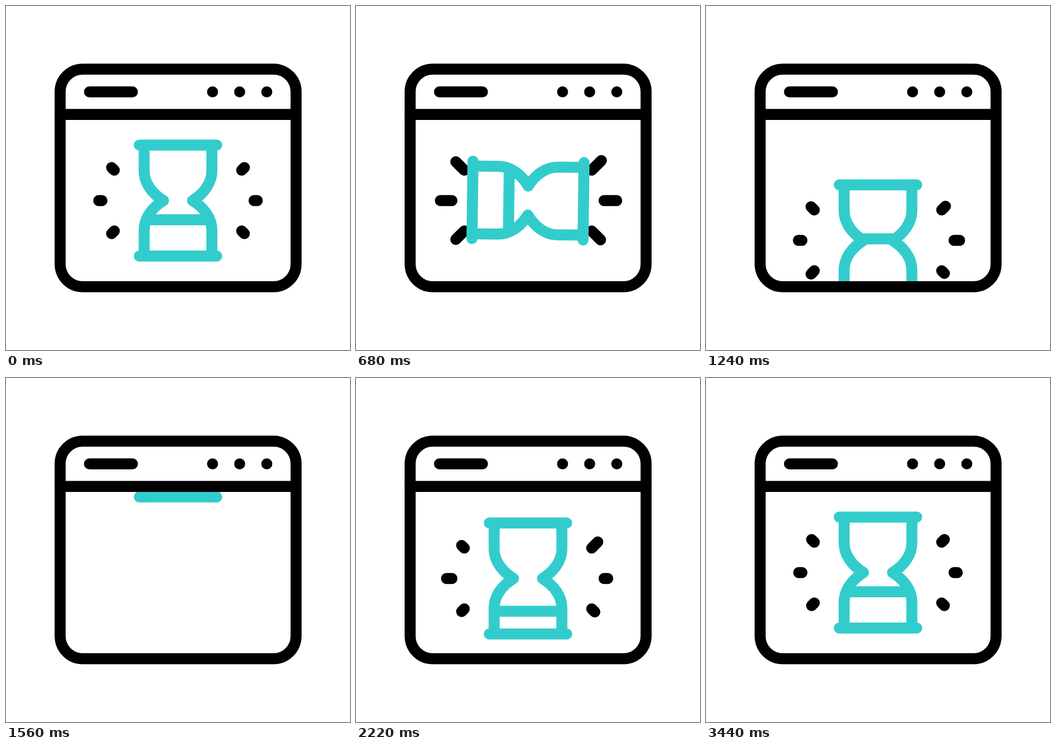
These frames come from a looping animation (640 by 640 pixels, 3.6 s). An HTML page:

```html
<!DOCTYPE html>
<html lang="en">
<head>
<meta charset="utf-8">
<title>Loading window</title>
<style>
  html, body { margin: 0; height: 100%; overflow: hidden; background: #fff; }
  svg { display: block; width: 100vw; height: 100vh; }
</style>
</head>
<body>
<svg viewBox="0 0 640 640" fill="none" stroke-width="20.5" stroke-linecap="round" stroke-linejoin="round">
  <clipPath id="page"><rect x="105" y="202" width="430" height="320"/></clipPath>
  <clipPath id="inside">
    <path d="M-63-103V-55C-63-32-47-12-27 0C-47 12-63 32-63 55V103H63V55C63 32 47 12 27 0C47-12 63-32 63-55V-103Z"/>
  </clipPath>
  <g clip-path="url(#page)">
    <g id="mover">
      <g id="rays" stroke="#000"></g>
      <g id="glass" stroke="#33cccc">
        <g clip-path="url(#inside)"><path id="sand" d="M-70 0H70"/></g>
        <path d="M-72-103.3H72M-72 103.3H72"/>
        <path d="M-63-103V-55C-63-32-47-12-27 0C-47 12-63 32-63 55V103"/>
        <path d="M63-103V-55C63-32 47-12 27 0C47 12 63 32 63 55V103"/>
      </g>
    </g>
  </g>
  <g stroke="#000">
    <rect x="100.7" y="117.5" width="439" height="404.8" rx="42"/>
    <path d="M101 201.7H539M155.3 159.7H235.2M384.3 159.7h.01M434.7 159.7h.01M485.2 159.7h.01"/>
  </g>
</svg>
<script>
const LOOP = 3600, START = 160, END = 3440;
const $ = id => document.getElementById(id);
const clamp = (v, lo = 0, hi = 1) => Math.min(hi, Math.max(lo, v));
const span = (t, a, b) => clamp((t - a) / (b - a));
const smooth = u => (1 - Math.cos(Math.PI * u)) / 2;

// Inner end, direction, shortest length, growth, phase drift
const rays = [
  [-118.5, -56.5, -1, -1, 5, 11, 0.13],
  [-141.5, 0, -1, 0, 6, 16, -0.06],
  [-118.5, 56.5, -1, 1, 5, 11, 0.13],
  [118.5, -56.5, 1, -1, 5, 14, -0.13],
  [141.5, 0, 1, 0, 6, 18.5, 0.2],
  [118.5, 56.5, 1, 1, 5, 11.5, 0.03],
].map(([x, y, dx, dy, min, grow, drift]) => {
  const el = document.createElementNS("http://www.w3.org/2000/svg", "path");
  $("rays").append(el);
  return u => {
    const phase = 3 * u + drift * Math.sin(Math.PI * u);
    const length = min + grow * smooth(2 * phase);
    el.setAttribute("d", `M${x} ${y}l${dx * length} ${dy * length}`);
  };
});

// Half turn with a small swing back before and past the end
function turn(t) {
  if (t >= 1490) return 0;
  const c = 1.356, v = 2 * span(t, START, 1200);
  const back = x => x * x * ((c + 1) * x - c) / 2;
  return 180 * (v < 1 ? back(v) : 1 - back(2 - v));
}

// Lifts, drops out below, comes in from above and settles
function shift(t) {
  if (t < 940) return -22.5 * smooth(span(t, 680, 940));
  if (t < 1490) return -22.5 + 322.5 * span(t, 940, 1490) ** 2;
  if (t < 2150) return 13 - 313 * (1 - span(t, 1500, 2150)) ** 2;
  return 13 * (1 - smooth(span(t, 2150, 2422)));
}

function sandLevel(t) {
  if (t < 1490) return 35.7 * (1 - span(t, 680, 1290));
  return 35.7 + 25.5 * (1.0 * clamp(END - t, 0, END) / 1220) ** 1.5;
}

function draw() {
  const t = performance.now() % LOOP;
  rays.forEach(ray => ray(span(t, START, END)));
  $("mover").setAttribute("transform", `translate(320 ${362 + shift(t)})`);
  $("glass").setAttribute("transform", `rotate(${turn(t)})`);
  $("sand").setAttribute("transform", `translate(0 ${sandLevel(t)})`);
  requestAnimationFrame(draw);
}
draw();
</script>
</body>
</html>
```
